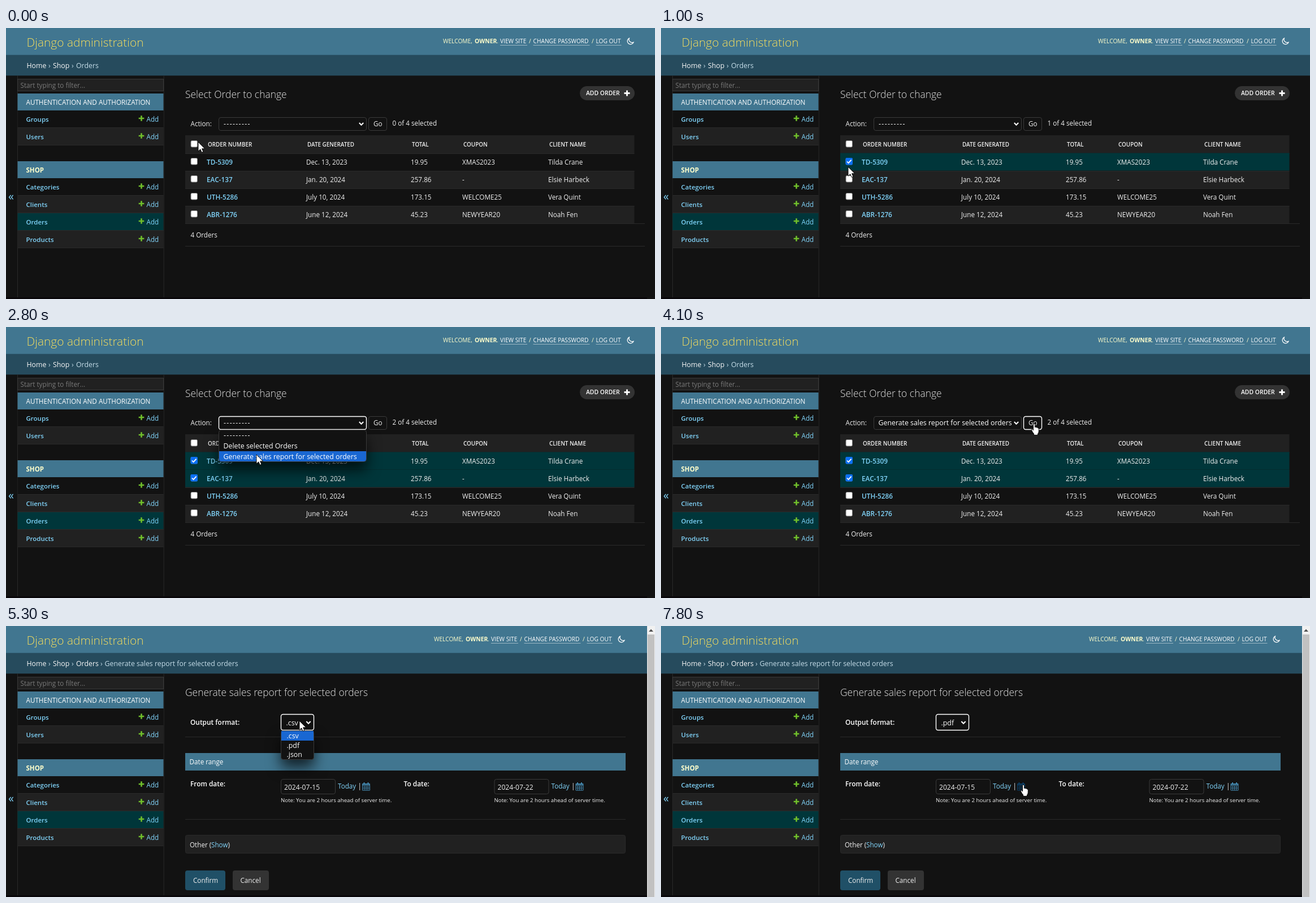
An HTML page for the animation above (8 s loop, 1148 by 480 pixels).

```html
<!DOCTYPE html>
<html lang="en">
<head>
<meta charset="utf-8">
<title>Orders</title>
<style>
  html, body { margin: 0; width: 100%; height: 100%; overflow: hidden; background: #121212; }
  svg { display: block; width: 1148px; height: 480px; }
  text { font: 11.7px "Open Sans", "Noto Sans", sans-serif; fill: #f0f0f0; white-space: pre; }
  .brand { font-size: 20.9px; font-weight: 340; fill: #f5dd5d; }
  .h1 { font-size: 17.45px; font-weight: 340; fill: #e4e4e4; }
  .tools { font-size: 10.2px; fill: #ffc; }
  .tools.a { fill: #fff; }
  .tools.b { font-weight: 700; font-size: 10.4px; }
  .crumb { font-size: 12.35px; fill: #f7f7f7; }
  .crumb.dim { fill: #c4dce8; }
  .hint { fill: #7a7a7a; }
  .app { fill: #fff; }
  .app.on { fill: #ffc; font-weight: 700; font-size: 11.5px; }
  .model { font-size: 11.5px; font-weight: 600; fill: #81d4fa; }
  .link { fill: #81d4fa; }
  .id { font-size: 11.8px; font-weight: 600; fill: #81d4fa; }
  .th { font-size: 9.9px; font-weight: 600; }
  .pill { font-size: 10.4px; font-weight: 600; fill: #fff; }
  .opt { font-size: 12.35px; fill: #fff; }
  .dash { letter-spacing: 1.35px; }
  .label { font-size: 11.9px; font-weight: 600; fill: #fff; }
  .date { font-size: 12.1px; }
  .note { font-size: 9.7px; }
  .chevrons { font-size: 20px; fill: #81d4fa; }
  .popup { filter: drop-shadow(0 14px 12px rgba(0, 0, 0, .7)); }
</style>
</head>
<body>
<svg id="stage" viewBox="0 0 1148 480"></svg>
<script>
const LINE = '#2a2a2a', BORDER = '#3a3a3a', ALT = '#212121', PICK = '#00363a',
      BAR = '#417690', BG = '#121212', HILITE = '#1967d2';

const text = (x, y, s, cls = '') => `<text x="${x}" y="${y}" class="${cls}">${s}</text>`;
const rect = (x, y, w, h, fill, more = '') =>
  `<rect x="${x}" y="${y}" width="${w}" height="${h}" fill="${fill}" ${more}/>`;
const path = (d, stroke, width, more = '') =>
  `<path d="${d}" fill="none" stroke="${stroke}" stroke-width="${width}" ${more}/>`;
const group = (id, body, more = '') => `<g id="${id}" ${more}>${body}</g>`;
const box = (x, y, w, h, id = '', r = 3.5, fill = BG) =>
  rect(x + .5, y + .5, w - 1, h - 1, fill, `id="${id}" rx="${r}" stroke="${BORDER}"`);
const plus = (x, y, r, color, w) => path(`M${x - r} ${y}h${2 * r}M${x} ${y - r}v${2 * r}`, color, w);
const caret = (x, y) => path(`M${x - 3.7} ${y - 2}l3.7 3.8 3.7 -3.8`, '#fff', 2);

function header() {
  const tool = (x, w, s) => text(x, 27, s, 'tools a') + rect(x, 30, w, 1, '#9db9c6');
  return rect(0, 0, 1148, 48, BAR) + rect(0, 47.7, 1148, 36.6, '#264b5d') +
    text(36.5, 33, 'Django administration', 'brand') +
    group('tools',
      text(773, 27, 'WELCOME,', 'tools') + text(829, 27, 'OWNER', 'tools b') + text(868, 27, '.', 'tools') +
      tool(874, 48, 'VIEW SITE') + text(925, 27, '/', 'tools') +
      tool(932.5, 100, 'CHANGE PASSWORD') + text(1036, 27, '/', 'tools') +
      tool(1043.5, 45, 'LOG OUT') +
      path('M1102.3 18.2a5.6 5.6 0 1 0 7.6 7.2a5.7 5.7 0 0 1 -7.6 -7.2z', '#fff', 1.3)) +
    text(36.5, 71, 'Home', 'crumb') + text(75, 71, '›', 'crumb dim') +
    text(83, 71, 'Shop', 'crumb') + text(116, 71, '›', 'crumb dim');
}

function sidebar() {
  const app = (name, y, cls) => rect(20.5, y, 258, 30.4, BAR) + text(35.5, y + 20, name, cls);
  const model = (name, y, fill) => rect(20.5, y, 258, 31, fill) + rect(20.5, y + 30, 258, 1, LINE) +
    text(35.5, y + 20, name, 'model') + plus(239.5, y + 14, 4.8, '#70bf2b', 2.6) +
    text(248.5, y + 20, 'Add', 'link');
  return rect(20, 84, 1, 396, LINE) + rect(278.7, 84, 1, 396, LINE) +
    box(20, 90, 259, 22, '', 0, ALT) + text(25.5, 106, 'Start typing to filter...', 'hint') +
    app('AUTHENTICATION AND AUTHORIZATION', 116, 'app') +
    model('Groups', 146, BG) + model('Users', 177, ALT) +
    app('SHOP', 236, 'app on') +
    model('Categories', 266, BG) + model('Clients', 297, ALT) +
    model('Orders', 328, PICK) + model('Products', 359, ALT) +
    group('fold', text(4, 305, '«', 'chevrons'));
}

function listPage() {
  const columns = [355, 531, 716, 807, 959];
  const orders = [
    ['TD-5309', 'Dec. 13, 2023', '19.95', 'XMAS2023', 'Tilda Crane'],
    ['EAC-137', 'Jan. 20, 2024', '257.86', '-', 'Elsie Harbeck'],
    ['UTH-5286', 'July 10, 2024', '173.15', 'WELCOME25', 'Vera Quint'],
    ['ABR-1276', 'June 12, 2024', '45.23', 'NEWYEAR20', 'Noah Fen']];
  const check = y => rect(327, y, 11.5, 11.5, '#fff', 'rx="2" stroke="#767676"');
  const row = (cells, i) => {
    const y = 222 + 31 * i;
    return rect(317, y, 794.5, 31, i % 2 ? ALT : BG) + rect(317, y, 794.5, 1, LINE) +
      group('picked' + i, rect(317, y - .5, 794.5, 31, PICK)) + check(y + 8.5) +
      group('tick' + i, rect(326.5, y + 8, 12.5, 12.5, '#0b70f5', 'rx="2"') +
        path(`M329 ${y + 14.5}l2.6 2.7 5 -5.6`, '#fff', 1.8)) +
      cells.map((s, c) => text(columns[c], y + 20, s, c ? '' : 'id')).join('');
  };
  const heads = ['ORDER NUMBER', 'DATE GENERATED', 'TOTAL', 'COUPON', 'CLIENT NAME'];
  return text(124, 71, 'Orders', 'crumb dim') +
    text(317, 124, 'Select Order to change', 'h1') +
    rect(1015, 103, 97, 25, '#333', 'rx="12.5"') + text(1026, 119, 'ADD ORDER', 'pill') +
    plus(1098.5, 115.5, 5, '#fff', 2.8) +
    text(326.5, 174, 'Action:') + box(376, 158, 262, 24, 'action') + caret(628.5, 170) +
    group('noAction', text(385, 174, '---------', 'opt dash')) +
    group('report', text(384.5, 174, 'Generate sales report for selected orders', 'opt')) +
    box(641, 158, 33, 24, 'go') + text(650, 174, 'Go') +
    `<text id="count" x="683.5" y="173"></text>` +
    rect(317, 190, 794.5, 32, ALT) + check(199.5) +
    heads.map((s, c) => text(columns[c] + 2, 210, s, 'th')).join('') +
    orders.map(row).join('') +
    rect(317, 346, 813, 1, LINE) + text(326.5, 371, '4 Orders') + rect(317, 386, 813, 1, LINE) +
    group('actionMenu',
      rect(376.5, 182.5, 261, 56, BG, `rx="4" stroke="${BORDER}"`) +
      text(385, 196, '---------', 'opt dash') + text(384.5, 214.5, 'Delete selected Orders', 'opt') +
      `<path d="M377 220h260v14q0 4 -4 4h-252q-4 0 -4 -4z" fill="${HILITE}"/>` +
      text(384.5, 233.5, 'Generate sales report for selected orders', 'opt'), 'class="popup"');
}

function formPage() {
  const calendar = (x, id) => group(id,
    path(`M${x} 279.5h13v11.5h-13zM${x} 283h13M${x} 287h13M${x + 3.3} 283v8M${x + 6.5} 283v8M${x + 9.7} 283v8`, 'currentColor', 1) +
    path(`M${x} 280.5h13M${x + 3} 277v4M${x + 10} 277v4`, 'currentColor', 2), 'color="#4489b0"');
  const dateField = (x, label, value, id) =>
    text(x - 160, 284, label, 'label') + box(x, 271, 97, 27) + text(x + 6, 290, value, 'date') +
    text(x + 101, 288, 'Today', 'link') + text(x + 136.5, 288, '|') + calendar(x + 144.5, id) +
    text(x, 312, 'Note: You are 2 hours ahead of server time.', 'note');
  const option = (s, y, on) => group(on, rect(487, y, 57, 17, HILITE)) + text(496.5, y + 13, s, 'opt');
  return text(124, 71, 'Orders', 'crumb') + text(167, 71, '›', 'crumb dim') +
    text(174.5, 71, 'Generate sales report for selected orders', 'crumb dim') +
    text(317, 124, 'Generate sales report for selected orders', 'h1') +
    text(326, 175, 'Output format:', 'label') + box(486, 156, 59, 29, 'format') + caret(535, 171) +
    `<text id="chosen" x="495.5" y="176" class="opt"></text>` +
    rect(317, 196, 779, 1, LINE) + rect(317, 225, 779, 31, BAR) + text(324.5, 245, 'Date range', 'app') +
    dateField(486, 'From date:', '2024-07-15', 'fromIcon') +
    dateField(863.5, 'To date:', '2024-07-22', 'toIcon') +
    rect(317, 342, 779, 1, LINE) +
    rect(317.5, 370.5, 778, 32, ALT, `rx="3" stroke="${LINE}"`) + text(325, 392, 'Other (') +
    text(363, 392, 'Show', 'link') + text(392.5, 392, ')') +
    rect(317, 433, 71, 35, '#205067', 'rx="4"') + text(331, 455, 'Confirm') +
    rect(401, 433, 64, 35, '#333', 'rx="4"') + text(414.5, 455, 'Cancel') +
    rect(1134, 0, 14, 480, '#f1f1f1') + rect(1135, 15, 12, 465, '#c1c1c1') +
    '<path d="M1137 10l4 -4.5 4 4.5z" fill="#505050"/>' +
    group('formatMenu',
      rect(486.5, 185.5, 58, 51, BG, `rx="4" stroke="${BORDER}"`) +
      option('.csv', 186, 'onCsv') + option('.pdf', 203, 'onPdf') + option('.json', 219, 'onJson'),
      'class="popup"');
}

const pointer = group('pointer',
  '<path id="arrow" d="M0 0V16.3L3.8 12.8 6.2 18.3 8.9 17.2 6.6 11.8H11.7Z" fill="#fff" stroke="#000" stroke-width=".9"/>' +
  '<path id="hand" transform="scale(.9 .97)" d="M-1.6 1.4q1.6 -2.6 3.2 0v5.2q2 -1 3 .6 2 -.8 2.7 1 1.6 -.2 1.9 1.6v4.6q-.3 3 -2 4.4v2.2h-7.6v-2.2q-2.6 -2.6 -4.6 -6.6 -.8 -2.6 1.4 -2l2 2.2z" fill="#fff" stroke="#000"/>');

const stage = document.getElementById('stage');
stage.innerHTML = rect(0, 0, 1148, 480, BG) + header() + sidebar() +
  group('list', listPage()) + group('form', formPage()) +
  rect(0, 477, 1134, 3, '#09070a') + pointer;
const el = Object.fromEntries([...stage.querySelectorAll('[id]')].map(n => [n.id, n]));

// Pointer stops: time, x, y
const stops = [
  [0, 340, 202], [600, 333, 236], [800, 333, 237], [1000, 331, 246], [1300, 333, 267], [1600, 333, 267],
  [2200, 409, 179], [2400, 409, 179], [2800, 443, 226], [3000, 446, 229], [3200, 446, 229],
  [3800, 660, 171], [4400, 660, 171], [5200, 519, 168], [5500, 519, 168], [5800, 511, 211],
  [6700, 511, 211], [7600, 638, 284], [7800, 641, 281], [8000, 641, 281]];

function pointerAt(t) {
  const i = stops.findIndex(s => s[0] > t);
  const [t0, x0, y0] = stops[i - 1], [t1, x1, y1] = stops[i];
  const p = (t - t0) / (t1 - t0), e = p * p * (3 - 2 * p);
  return [x0 + (x1 - x0) * e, y0 + (y1 - y0) * e];
}

const show = (id, on) => { el[id].style.display = on ? '' : 'none'; };
const focus = (id, on) => {
  el[id].setAttribute('stroke', on ? '#fff' : BORDER);
  el[id].setAttribute('stroke-width', on ? 1.4 : 1);
};

function render(t) {
  const form = t >= 4400, reported = t >= 3200, pdf = t >= 6300;
  const picked = [t >= 700, t >= 1400, false, false];
  show('list', !form);
  show('form', form);
  el.tools.setAttribute('transform', `translate(${form ? -16 : 0})`);
  el.fold.setAttribute('transform', `translate(0 ${form ? 7 : 0})`);

  picked.forEach((on, i) => { show('picked' + i, on); show('tick' + i, on); });
  el.count.textContent = `${picked.filter(Boolean).length} of 4 selected`;
  show('actionMenu', t >= 2400 && !reported);
  show('noAction', !reported);
  show('report', reported);
  focus('action', t >= 2400 && t < 4000);
  focus('go', t >= 4000);

  const overPdf = t >= 5700;
  show('formatMenu', t >= 5300 && !pdf);
  show('onCsv', !overPdf);
  show('onPdf', overPdf);
  show('onJson', false);
  el.chosen.textContent = pdf ? '.pdf' : '.csv';
  focus('format', t >= 5300);

  const overIcon = t >= 7600;
  el.fromIcon.setAttribute('color', overIcon ? '#0b3f66' : '#4489b0');
  const hand = (t >= 3700 && t < 4500) || overIcon;
  show('hand', hand);
  show('arrow', !hand);
  el.pointer.setAttribute('transform', `translate(${pointerAt(t)})`);
}

const start = performance.now();
function tick() {
  render(Math.floor((performance.now() - start) % 8000 / 100) * 100);
  requestAnimationFrame(tick);
}
tick();
</script>
</body>
</html>
```
